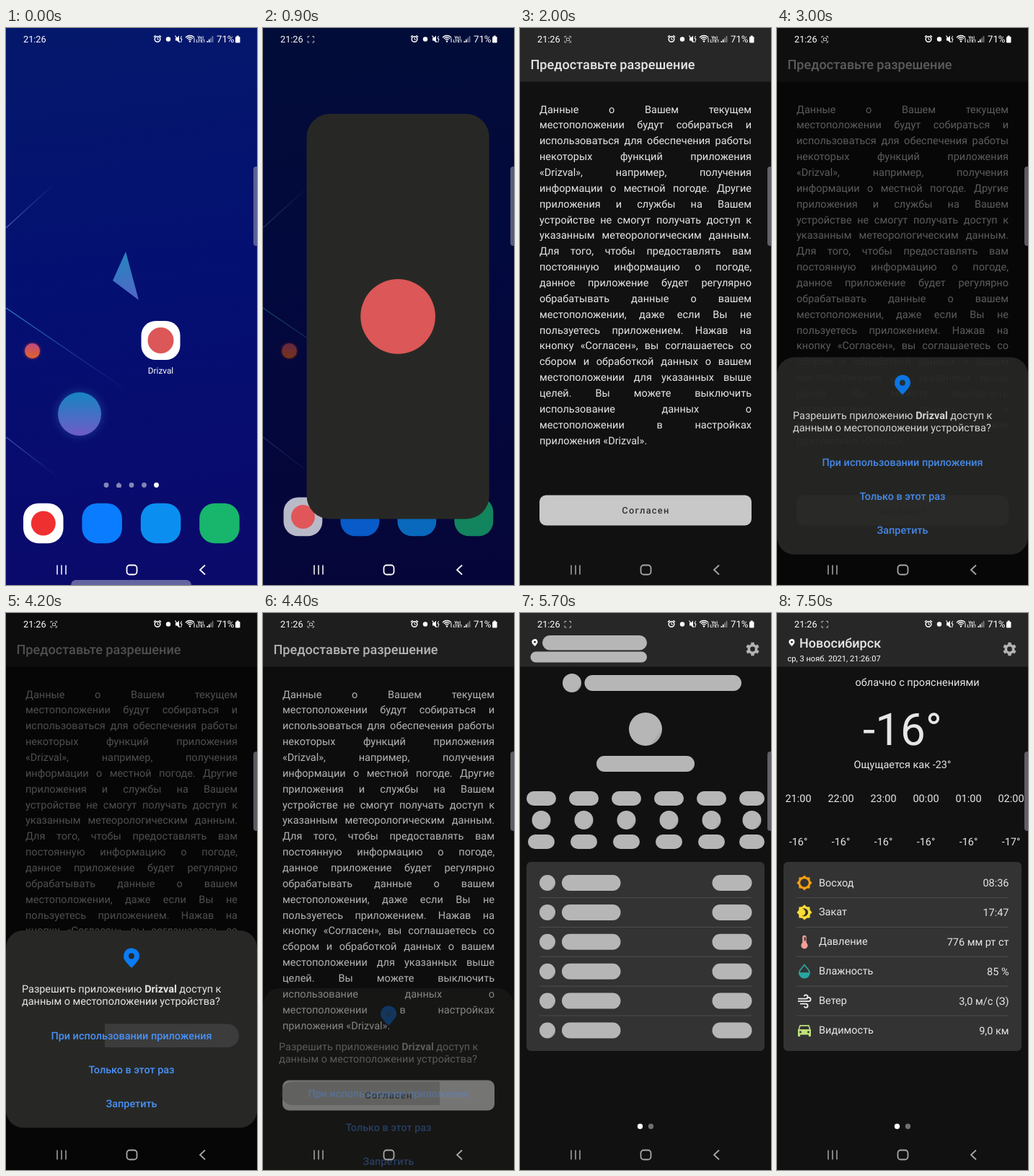
An HTML page with a canvas for the animation above (8 s loop, 348 by 772 pixels).

```html
<!DOCTYPE html>
<html lang="ru">
<head>
<meta charset="utf-8">
<style>
html, body { margin: 0; width: 348px; height: 772px; overflow: hidden; background: #111; }
canvas { display: block; }
</style>
</head>
<body>
<canvas id="stage" width="348" height="772"></canvas>
<script>
const W = 348, H = 772, LOOP = 8000, APP = 'Drizval';
const c = document.getElementById('stage').getContext('2d');
c.textRendering = 'geometricPrecision';

const span = (t, from, to) => Math.min(1, Math.max(0, (t - from) / (to - from)));
const easeOut = (u, power) => 1 - Math.pow(1 - u, power);
const mix = (a, b, u) => a + (b - a) * u;

function faded(alpha, draw) {
  if (alpha <= 0) return;
  c.save();
  c.globalAlpha *= alpha;
  draw();
  c.restore();
}

function box(x, y, w, h, r, fill) {
  c.fillStyle = fill;
  c.beginPath();
  c.roundRect(x, y, w, h, r);
  c.fill();
}

function dot(x, y, r, fill) {
  c.fillStyle = fill;
  c.beginPath();
  c.arc(x, y, r, 0, Math.PI * 2);
  c.fill();
}

function poly(points, fill) {
  c.fillStyle = fill;
  c.beginPath();
  points.forEach(([x, y]) => c.lineTo(x, y));
  c.closePath();
  c.fill();
}

function line(points, color, width = 1) {
  c.strokeStyle = color;
  c.lineWidth = width;
  c.beginPath();
  points.forEach(([x, y], i) => i ? c.lineTo(x, y) : c.moveTo(x, y));
  c.stroke();
}

function ramp(x0, y0, x1, y1, ...colors) {
  const g = c.createLinearGradient(x0, y0, x1, y1);
  colors.forEach((color, i) => g.addColorStop(i / (colors.length - 1), color));
  return g;
}

function font(size, weight = 400, spacing = 0) {
  c.font = `${weight} ${size}px Roboto, sans-serif`;
  c.letterSpacing = spacing + 'px';
}

function text(str, x, y, size, { color = '#e6e6e6', weight = 400, spacing = 0, align = 'left' } = {}) {
  font(size, weight, spacing);
  c.fillStyle = color;
  c.textAlign = align;
  c.fillText(str, x, y);
}

const BODY_SIZE = 14.5;
const body = (str, x, y, align = 'left') => text(str, x, y, BODY_SIZE, { align });

// ---- system bars ----

function statusBar(t) {
  const white = '#fff';
  text('21:26', 24, 20, 12.7, { color: white });
  if (t >= 500) {
    for (const [x, dx] of [[62, 2.4], [70.5, -2.4]])
      for (const [y, dy] of [[11.5, 2.4], [20, -2.4]])
        line([[x + dx, y], [x, y], [x, y + dy]], '#bbb', 1);
    if (t >= 1000 && Math.floor(t / 500) % 2 === 0) {
      c.strokeStyle = '#bbb';
      c.strokeRect(64.5, 14, 4, 3.6);
    }
  }
  // alarm
  c.strokeStyle = white;
  c.lineWidth = 1.5;
  c.beginPath();
  c.arc(210, 15.5, 3.8, 0, 7);
  c.stroke();
  line([[210, 13], [210, 16], [212, 16]], white);
  line([[205, 12.5], [207.5, 10.2]], white, 1.4);
  line([[215, 12.5], [212.5, 10.2]], white, 1.4);
  dot(225, 15.5, 3.2, white);
  // muted speaker
  poly([[235, 13.5], [237, 13.5], [240, 10.5], [240, 20], [237, 17.5], [235, 17.5]], white);
  line([[234.5, 10.5], [241, 20]], white, 1.2);
  line([[243.5, 11], [242, 15], [244, 15], [242.5, 20]], white, 1);
  // wi-fi
  for (const r of [3, 5.5, 8]) {
    c.beginPath();
    c.lineWidth = 1.3;
    c.arc(255, 18.5, r, -Math.PI * 0.77, -Math.PI * 0.23);
    c.stroke();
  }
  dot(255, 18.5, 1.2, white);
  line([[261, 14], [261, 20]], white);
  text('Vo)', 265.5, 14.5, 5.6, { color: white, weight: 700 });
  text('LTE1', 263.5, 20, 5.8, { color: white, weight: 700 });
  for (let i = 0; i < 4; i++)
    box(278.5 + i * 2.4, 18 - i * 2.3, 1.6, 2 + i * 2.3, 0, i < 2 ? white : 'rgba(255,255,255,.45)');
  text('71%', 292, 20, 13.2, { color: white });
  box(318, 12, 6.5, 8.5, 1.2, white);
  box(319.7, 10.6, 3, 2, 0, white);
}

function navBar(t) {
  const color = t < 1500 ? '#fff' : '#a8a8a8';
  for (const x of [71, 77, 83]) line([[x, 744.5], [x, 757.5]], color, 1.5);
  c.lineWidth = 1.8;
  c.beginPath();
  c.roundRect(167.5, 744.5, 14, 13, 4);
  c.stroke();
  line([[276, 744.5], [269, 751], [276, 757.5]], color, 1.8);
}

// ---- home screen ----

function ball(x, y, r, top, bottom, glow) {
  const g = c.createRadialGradient(x, y, r, x, y, r * 1.5);
  g.addColorStop(0, glow);
  g.addColorStop(1, 'rgba(0,0,60,0)');
  dot(x, y, r * 1.5, g);
  dot(x, y, r, ramp(x, y - r, x, y + r, top, bottom));
}

function wallpaper() {
  box(0, 0, W, H, 0, ramp(0, 0, 90, H, '#04186b', '#040f72', '#0a0a6b'));
  const streaks = [[0, 277, 67, 216, '#4a62b4'], [0, 388, 164, 500, '#2e86c8'], [0, 567, 70, 621, '#3d56b0']];
  for (const [x0, y0, x1, y1, color] of streaks)
    line([[x0, y0], [x1, y1]], ramp(x0, y0, x1, y1, color, 'rgba(60,80,190,.05)'), 1.2);
  poly([[166, 310], [148, 350], [184, 377]], ramp(160, 310, 175, 377, '#2386bd', '#5366c8'));
  ball(36.5, 447.5, 10.5, '#c04a80', '#e0622a', 'rgba(170,60,90,.35)');
  ball(102, 535, 30, '#1685c2', '#6f5bc6', 'rgba(40,90,190,.28)');
}

function home(t) {
  const u = span(t, 500, 900);
  wallpaper();
  box(0, 0, W, H, 0, `rgba(0,0,0,${0.47 * u})`);
  faded(mix(1, 0.72, u), () => {
    const s = mix(1, 0.97, u);
    c.translate(174, 386);
    c.scale(s, s);
    c.translate(-174, -386);
    if (t < 600) {
      box(187.5, 406, 54, 54, 20, '#fff');
      dot(214.5, 433, 18, '#dc5757');
    }
    text(APP, 214.5, 479, 11.8, { color: '#fff', align: 'center' });
    const pale = 'rgba(255,255,255,.5)';
    [139, 174, 191.5].forEach(x => dot(x, 633.5, 3.4, pale));
    poly([[152.7, 633], [156.5, 629.8], [160.3, 633], [159.4, 637], [153.6, 637]], pale);
    dot(208.5, 633.5, 3.4, '#fff');
    ['#fff', '#0a7cff', '#0a8ff0', '#18b56c'].forEach((fill, i) =>
      box(24 + i * 81.4, 658.7, 55.5, 55.5, 21, fill));
    dot(51.8, 686.5, 17, '#f03030');
  });
  faded(1 - span(t, 400, 700), () => box(90, 765, 167, 14, 7, 'rgba(150,150,190,.65)'));
}

function splash(t) {
  const u = span(t, 500, 1300);
  const px = easeOut(u, 1.63), py = easeOut(u, 1.77);
  const w = mix(54, W, px), h = mix(54, H, py);
  const x = mix(214.5, 174, px), y = mix(433, 386, py);
  faded(span(t, 450, 650), () => {
    const r = u < 1 ? mix(20, 32, Math.min(1, u * 2)) : 0;
    box(x - w / 2, y - h / 2, w, h, r, '#272825');
    dot(x, y, mix(18, 68, px), '#dc5757');
  });
}

// ---- permission screen ----

const TERMS = `Данные о Вашем текущем
местоположении будут собираться и
использоваться для обеспечения работы
некоторых функций приложения
«${APP}», например, получения
информации о местной погоде. Другие
приложения и службы на Вашем
устройстве не смогут получать доступ к
указанным метеорологическим данным.
Для того, чтобы предоставлять вам
постоянную информацию о погоде,
данное приложение будет регулярно
обрабатывать данные о вашем
местоположении, даже если Вы не
пользуетесь приложением. Нажав на
кнопку «Согласен», вы соглашаетесь со
сбором и обработкой данных о вашем
местоположении для указанных выше
целей. Вы можете выключить
использование данных о
местоположении в настройках
приложения «${APP}».`.split('\n');

function justified(str, x, y, width) {
  const words = str.split(' ');
  font(BODY_SIZE);
  const widths = words.map(word => c.measureText(word).width);
  const gap = (width - widths.reduce((a, b) => a + b)) / (words.length - 1);
  words.forEach((word, i) => {
    body(word, x, y);
    x += widths[i] + gap;
  });
}

function screenBase() {
  box(0, 0, W, H, 0, '#111');
  box(0, 0, W, 74.5, 0, '#272727');
}

function permission() {
  screenBase();
  text('Предоставьте разрешение', 14.5, 56.5, 18.1, { weight: 500 });
  TERMS.forEach((str, i) => {
    const y = 117.5 + i * 21.86;
    if (i < TERMS.length - 1) justified(str, 27, y, 294);
    else body(str, 27, y);
  });
  box(27, 647.5, 294, 42, 9, '#c8c8c8');
  text('Согласен', 174.5, 673.3, 12.8, { color: '#333', weight: 500, spacing: 1.3, align: 'center' });
}

function pin(x, y, w, fill, hole) {
  const r = w / 2;
  c.fillStyle = fill;
  c.beginPath();
  c.arc(x, y, r, Math.PI * 0.92, Math.PI * 0.08);
  c.quadraticCurveTo(x + r * 0.8, y + r * 0.7, x, y + r * 1.5);
  c.quadraticCurveTo(x - r * 0.8, y + r * 0.7, x - r, y + r * 0.25);
  c.fill();
  dot(x, y, r * 0.36, hole);
}

function dialog(t) {
  const show = easeOut(span(t, 2750, 3100), 2);
  const hide = span(t, 4200, 4500);
  faded(show * (1 - hide), () => {
    box(0, 0, W, H, 0, 'rgba(0,0,0,.66)');
    c.translate(0, (1 - show) * 200 + hide * 120);
    box(0, 440, W, 273.5, 24, '#272825');
    pin(174, 475.5, 22, '#0a7cf5', '#272825');
    let x = 22;
    for (const [str, weight] of [['Разрешить приложению ', 400], [APP, 700], [' доступ к', 400]]) {
      text(str, x, 526, 14.45, { weight });
      x += c.measureText(str).width;
    }
    text('данным о местоположении устройства?', 22, 543, 14.45);
    if (t >= 4200) {
      c.save();
      c.beginPath();
      c.rect(137 - (t - 4200) * 1.2, 560, W, 50);
      c.clip();
      box(25, 569.5, 298, 32.5, 16, '#3b3c3b');
      c.restore();
    }
    ['При использовании приложения', 'Только в этот раз', 'Запретить'].forEach((str, i) =>
      text(str, 174, 591 + i * 47, 14.4, { color: '#4a90f8', weight: 500, align: 'center' }));
  });
}

// ---- weather screen ----

const rowY = i => 374 + i * 40.9;
const hourX = i => 29.5 + i * 59;

function gear(x, y, r, fill, hole) {
  c.fillStyle = fill;
  for (let i = 0; i < 6; i++) {
    c.save();
    c.translate(x, y);
    c.rotate(i * Math.PI / 3);
    c.fillRect(-r * 0.24, -r, r * 0.48, r);
    c.restore();
  }
  dot(x, y, r * 0.76, fill);
  dot(x, y, r * 0.37, hole);
}

function weatherBase() {
  screenBase();
  pin(20.5, 40.2, 8, '#fff', '#272727');
  gear(322.5, 50, 9.2, '#b4b4b4', '#272727');
  box(9, 345, 330, 262, 6, '#333');
  for (let i = 0; i < 5; i++) box(27, 394 + i * 40.9, 294, 1, 0, '#4c4c4c');
  dot(166.5, 711.5, 3.7, '#fff');
  dot(181.5, 711.5, 3.7, '#707070');
}

function skeleton(t) {
  const center = mix(-0.5, 1.7, span(t, 4700, 5700));
  const bone = (x, y, w, h) => box(x, y, w, h, h / 2, ramp(
    x + w * (center - 0.36), y, x + w * (center + 0.3), y + h * 0.5, '#b6b6b6', '#727272', '#b6b6b6'));
  bone(31, 31, 145, 20.5);
  bone(14.5, 53.5, 161.5, 15);
  bone(59, 84, 26, 26);
  bone(89.5, 86, 217.5, 22);
  bone(151, 138, 46, 46);
  bone(106, 198, 136, 22);
  for (let i = 0; i < 6; i++) {
    const x = i < 5 ? hourX(i) : 321.5, last = i === 5;
    const wide = last ? 35 : 41, narrow = last ? 35 : 37;
    bone(x - wide / 2, 247, wide, 20);
    bone(x - 13, 274, 26, 26);
    bone(x - narrow / 2, 307, narrow, 20);
    bone(27, rowY(i) - 11, 22, 22);
    bone(58, rowY(i) - 11, 81.5, 22);
    bone(266.5, rowY(i) - 11, 55, 22);
  }
}

function burst(x, y, fill) {
  const points = Array.from({ length: 16 }, (_, i) => {
    const a = i * Math.PI / 8, r = i % 2 ? 8.4 : 10.6;
    return [x + r * Math.cos(a), y + r * Math.sin(a)];
  });
  poly(points, fill);
}

const ICONS = [
  (x, y) => { burst(x, y, '#f5a012'); dot(x, y, 5.8, '#333'); },
  (x, y) => {
    burst(x, y, '#fddc35');
    dot(x - 0.5, y, 5.6, '#333');
    dot(x - 3.4, y, 4.8, '#fddc35');
  },
  (x, y) => {
    box(x - 2.7, y - 9, 5.4, 15, 2.7, '#f5a096');
    dot(x, y + 5, 4.6, '#f5a096');
    box(x - 0.3, y - 6.5, 2, 5, 0, '#333');
  },
  (x, y) => {
    const drop = r => {
      c.beginPath();
      c.moveTo(x, y - 9);
      c.lineTo(x + r * 0.78, y - 2.5);
      c.arc(x, y + 2, r, -0.65, Math.PI + 0.65);
      c.closePath();
    };
    drop(7);
    c.strokeStyle = c.fillStyle = '#27a6a0';
    c.lineWidth = 1.7;
    c.stroke();
    c.save();
    c.clip();
    c.fillRect(x - 9, y + 1.5, 18, 10);
    c.restore();
  },
  (x, y) => {
    c.strokeStyle = '#eee';
    c.lineWidth = 1.8;
    for (const [from, to, dy, dir] of [[-9, 2, -3, -1], [-9, 6, 0.5, -1], [-6, 2, 4, 1]]) {
      c.beginPath();
      c.moveTo(x + from, y + dy);
      c.lineTo(x + to, y + dy);
      c.arc(x + to, y + dy + dir * 2.6, 2.6, dir * -Math.PI / 2, dir * Math.PI * 0.9, dir < 0);
      c.stroke();
    }
  },
  (x, y) => {
    const green = '#bfe07a';
    poly([[x - 6.5, y - 7.5], [x + 6.5, y - 7.5], [x + 9, y], [x - 9, y]], green);
    box(x - 9, y - 1.5, 18, 7.5, 1, green);
    box(x - 9, y + 4, 3.2, 4.5, 1, green);
    box(x + 5.8, y + 4, 3.2, 4.5, 1, green);
    poly([[x - 5.4, y - 5.8], [x + 5.4, y - 5.8], [x + 6.8, y - 1.4], [x - 6.8, y - 1.4]], '#333');
    dot(x - 5.5, y + 2.2, 1.5, '#333');
    dot(x + 5.5, y + 2.2, 1.5, '#333');
  }
];

const ROWS = [
  ['Восход', '08:36'], ['Закат', '17:47'], ['Давление', '776 мм рт ст'],
  ['Влажность', '85 %'], ['Ветер', '3,0 м/с (З)'], ['Видимость', '9,0 км']
];

function weather() {
  text('Новосибирск', 31, 47.5, 18, { weight: 500 });
  text('ср, 3 нояб. 2021, 21:26:07', 14.5, 66.7, 11.1, { color: '#fff' });
  body('облачно с прояснениями', 108.5, 101);
  text('-16°', 174, 183, 62, { align: 'center' });
  body('Ощущается как -23°', 174, 215, 'center');
  ['21', '22', '23', '00', '01', '02'].forEach((hour, i) => {
    body(hour + ':00', hourX(i), 262, 'center');
    body(i < 5 ? '-16°' : '-17°', hourX(i), 322, 'center');
  });
  ROWS.forEach(([label, value], i) => {
    ICONS[i](38, rowY(i));
    body(label, 58, rowY(i) + 4.5);
    body(value, 321.5, rowY(i) + 5, 'right');
  });
}

// ---- timeline ----

function render(t) {
  if (t < 1700) {
    home(t);
    splash(t);
  }
  if (t < 4600) {
    faded(span(t, 1400, 1700), permission);
    dialog(t);
  }
  faded(span(t, 4400, 4600), () => {
    const loaded = span(t, 5700, 6000);
    weatherBase();
    faded(1 - loaded, () => skeleton(t));
    faded(loaded, weather);
  });
  box(343, 192, 10, 110, 4, 'rgba(175,175,190,.5)');
  statusBar(t);
  navBar(t);
}

const start = performance.now();
function tick() {
  const t = (performance.now() - start) % LOOP;
  render(Math.floor(t / 100) * 100);
  requestAnimationFrame(tick);
}
tick();
</script>
</body>
</html>
```
